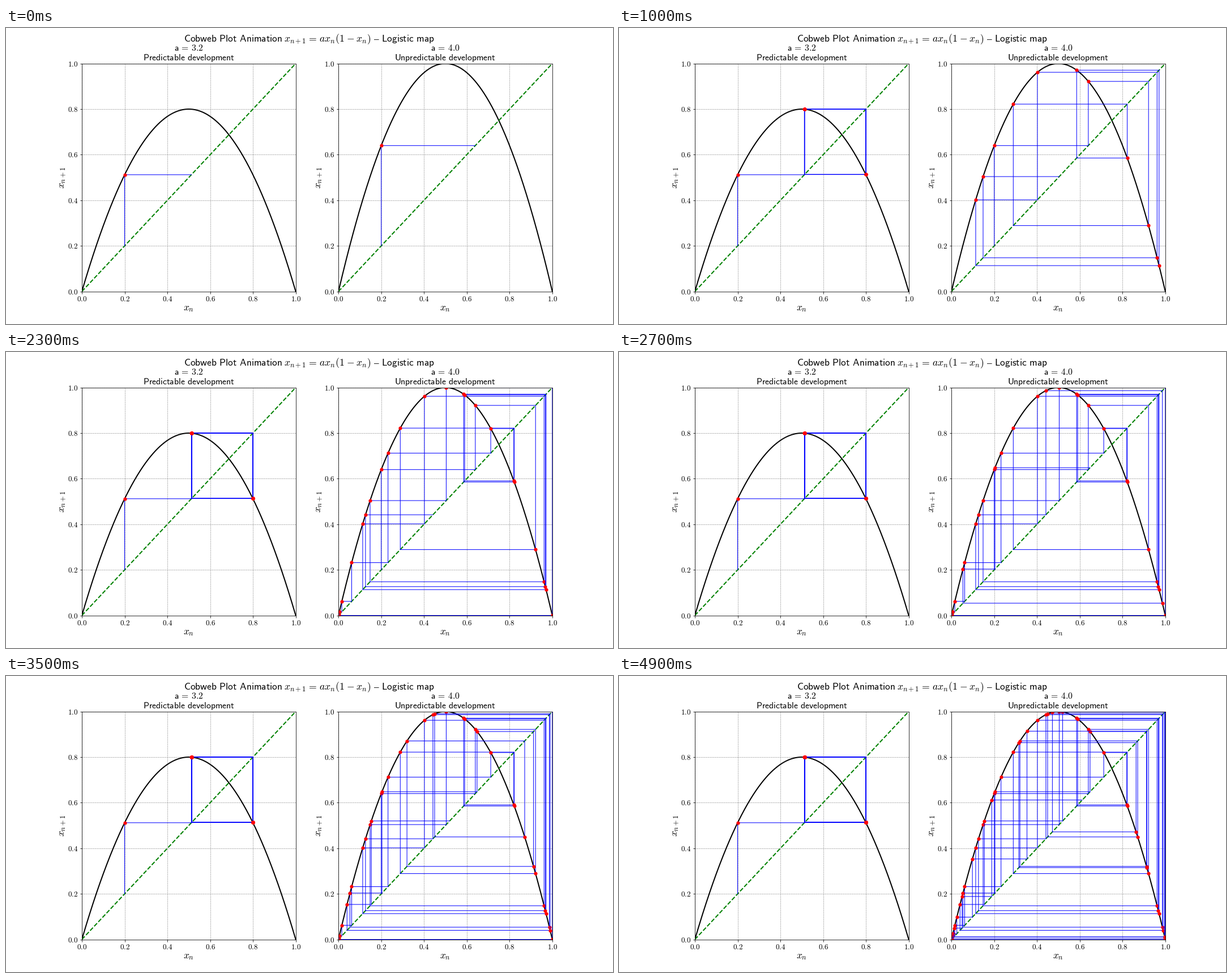
Write a matplotlib script that moves like this. It is 1072 px wide and 522 px high and loops after 5000 ms.

```python
import numpy as np
import matplotlib.pyplot as plt
from matplotlib.animation import FuncAnimation

W, H, DPI = 1072, 522, 64
PX = 72 / DPI          # points per pixel
FRAMES, INTERVAL = 50, 100
X0 = 0.2

plt.rcParams["mathtext.fontset"] = "cm"

fig = plt.figure(figsize=(W / DPI, H / DPI), dpi=DPI, facecolor="white")


def logistic(a, x):
    return a * x * (1 - x)


def put(x, y, text, size, **kw):
    """Text centred on x with its baseline at y, in pixels from the top left."""
    fig.text(x / W, 1 - y / H, text, fontsize=size * PX,
             ha="center", va="baseline", **kw)


def sans(text):
    # a third of an em between words, as in text mode
    return r"$\mathsf{" + text.replace(" ", r"\hspace{0.38}") + "}$"


def style(ax):
    ax.set(xlim=(0, 1), ylim=(0, 1))
    ticks = np.linspace(0, 1, 6)
    labels = [f"${t:.1f}$" for t in ticks]
    ax.set_xticks(ticks, labels)
    ax.set_yticks(ticks, labels)
    ax.tick_params(length=3.5 * PX, width=0.8 * PX, pad=3.5 * PX,
                   labelsize=13 * PX)
    ax.grid(True, color="gray", ls="--", lw=0.6 * PX)
    for spine in ax.spines.values():
        spine.set_linewidth(0.8 * PX)


def cobweb(ax, a):
    """Return one group of artists per iteration step."""
    steps, x = [], X0
    for _ in range(FRAMES):
        y = logistic(a, x)
        up, = ax.plot([x, x], [x, y], "b", lw=PX, snap=False)
        across, = ax.plot([x, y], [y, y], "b", lw=PX, snap=False)
        dot, = ax.plot(x, y, "ro", ms=5.2 * PX, mew=PX)
        steps.append((up, across, dot))
        x = y
    return steps


def panel(ax, a, caption):
    style(ax)
    x = np.linspace(0, 1, 500)
    ax.plot(x, logistic(a, x), "k", lw=2 * PX)
    ax.plot([0, 1], [0, 1], color="green", ls="--", lw=2 * PX)

    box = ax.get_position()
    mid = (box.x0 + box.x1) / 2 * W
    put(mid, 40, sans(rf"a\hspace{{0.18}}=\hspace{{0.18}}{a:.1f}"), 15.7)
    put(mid, 57, sans(caption), 15.7)
    put(mid, 498, "$x_n$", 17.5)
    put(box.x0 * W - 31, 264, "$x_{n+1}$", 17.5,
        rotation=90, rotation_mode="anchor")
    return cobweb(ax, a)


axes = fig.subplots(1, 2, gridspec_kw=dict(
    left=0.125, right=0.9, bottom=0.11, top=0.88, wspace=0.2))

put(401, 24, sans("Cobweb Plot Animation"), 17.3)
put(568, 24, r"$x_{n+1}\hspace{0.12}=\hspace{0.12}ax_n"
             r"(1\hspace{0.05}-\hspace{0.05}x_n)$", 17.7)
put(702.5, 24, sans("– Logistic map"), 17.3)

webs = [panel(axes[0], 3.2, "Predictable development"),
        panel(axes[1], 4.0, "Unpredictable development")]


def update(n):
    shown = []
    for web in webs:
        for i, group in enumerate(web):
            for artist in group:
                artist.set_visible(i <= n)
                shown.append(artist)
    return shown


anim = FuncAnimation(fig, update, frames=FRAMES, interval=INTERVAL,
                     repeat=True, repeat_delay=0)
plt.show()
```
